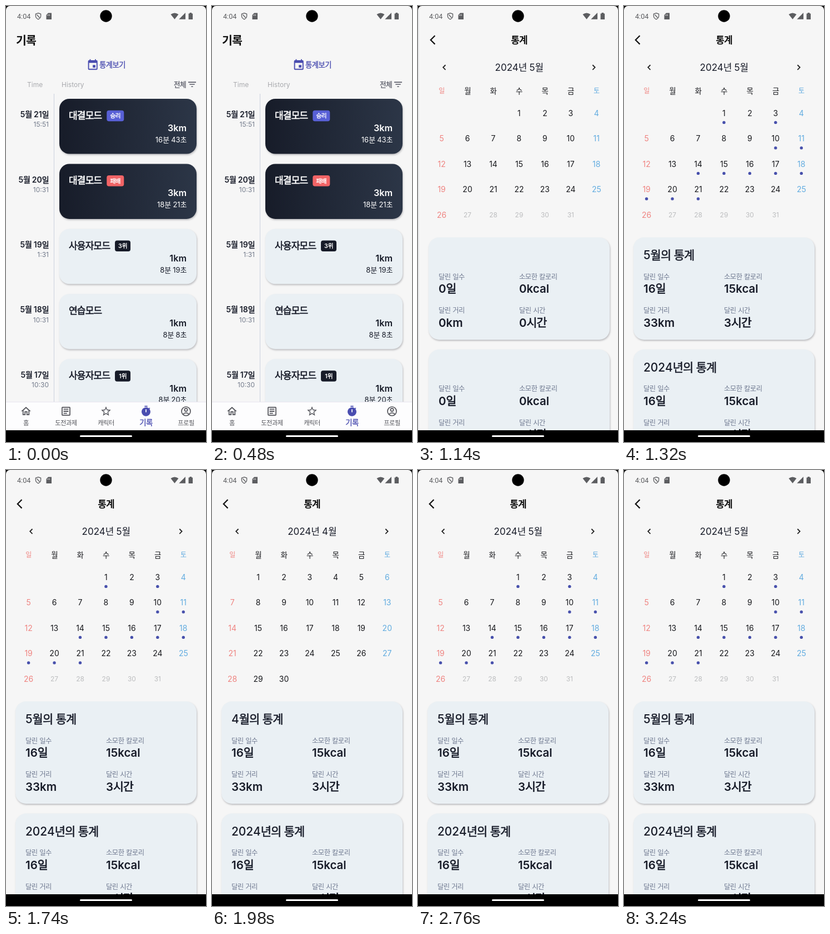
These frames come from a looping animation (360 px wide and 780 px high, 3300 ms). An HTML page:

```html
<!DOCTYPE html>
<html lang="ko">
<head>
<meta charset="utf-8">
<style>
  html, body { margin: 0; width: 100%; height: 100%; overflow: hidden; background: #f6f6f6; }
  svg { display: block; width: 100%; height: 100%; }
  text { font-family: Inter, "Noto Sans CJK KR", "Noto Sans CJK", sans-serif; white-space: pre; }
  .ko { letter-spacing: -.045em; }
  /* semi-bold Hangul: the regular cut, slightly thickened */
  .semi .ko { font-weight: 400; stroke-width: .036em; stroke-linejoin: round; }
  .medium .ko { font-weight: 400; stroke-width: .024em; stroke-linejoin: round; }
  .semi, .medium { stroke-width: 0; }
  .clock { font-family: Roboto, sans-serif; }
  .card { filter: drop-shadow(1px 2px 1.5px rgba(60, 60, 70, .3)); }
</style>
</head>
<body>
<svg id="stage" viewBox="0 0 360 780" xmlns="http://www.w3.org/2000/svg"></svg>
<script>
const LOOP = 3300, STEP = 60;
const INK = '#171b28', ACCENT = '#4a4db0', PAPER = '#f6f6f6', LIGHT = '#eaf0f4';
const RED = '#ef8481', BLUE = '#62ace0';
const COLUMN = 46.45, MONTH_WIDTH = COLUMN * 7;
const WEIGHT_CLASS = { 500: 'medium', 600: 'semi' };

const hangul = s => s.replace(/[가-힣]+/g, '<tspan class="ko">$&</tspan>');

// y is the vertical middle of the glyphs
function label(s, x, y, size, { fill = INK, weight = 400, anchor = 'start', id = '', cls = '' } = {}) {
  const base = y + size * (/[가-힣]/.test(s) ? .375 : .364);
  const tone = WEIGHT_CLASS[weight];
  return `<text ${id && `id="${id}"`} class="${tone || cls}" x="${x}" y="${base.toFixed(2)}" font-size="${size}"
    font-weight="${weight}" fill="${fill}" stroke="${tone ? fill : 'none'}" text-anchor="${anchor}">${hangul(s)}</text>`;
}
const box = (x, y, w, h, r, fill, cls = '') =>
  `<rect class="${cls}" x="${x}" y="${y}" width="${w}" height="${h}" rx="${r}" fill="${fill}"/>`;
const icon = (d, cx, cy, scale, fill) =>
  `<path transform="translate(${cx} ${cy}) scale(${scale}) translate(-12 -12)" fill="${fill}" fill-rule="evenodd" d="${d}"/>`;
const line = (d, stroke, width = 2) =>
  `<path fill="none" d="${d}" stroke="${stroke}" stroke-width="${width}"/>`;

const ICONS = {
  event: 'M17 12h-5v5h5zM16 1v2H8V1H6v2H5a2 2 0 0 0-2 2v14a2 2 0 0 0 2 2h14a2 2 0 0 0 2-2V5a2 2 0 0 0-2-2h-1V1zM19 19H5V8h14z',
  filter: 'M10 18h4v-2h-4zM3 6v2h18V6zM6 13h12v-2H6z',
  home: 'M12 5.7l5 4.5V18h-2v-6H9v6H7v-7.8zM12 3L2 12h3v8h6v-6h2v6h6v-8h3z',
  article: 'M19 5v14H5V5zM19 3H5a2 2 0 0 0-2 2v14a2 2 0 0 0 2 2h14a2 2 0 0 0 2-2V5a2 2 0 0 0-2-2zM14 17H7v-2h7zM17 13H7v-2h10zM17 9H7V7h10z',
  star: 'M22 9.24l-7.19-.62L12 2 9.19 8.63 2 9.24l5.46 4.73L5.82 21 12 17.27 18.18 21l-1.63-7.03zM12 15.4l-3.76 2.27 1-4.28-3.32-2.88 4.38-.38L12 6.1l1.71 4.04 4.38.38-3.32 2.88 1 4.28z',
  timer: 'M9 1h6v2H9zM19.03 7.39l1.42-1.42-1.41-1.41-1.42 1.42A9 9 0 1 0 19.03 7.39zM13 14h-2V8h2z'
};

function record(i, [day, time, mode, badge, badgeFill, distance, duration]) {
  const y = 166 + 116.4 * i, dark = i < 2, ink = dark ? '#fff' : INK;
  const badgeX = 122.3 + 14.75 * mode.length, badgeW = /\d/.test(badge) ? 28 : 31;
  return label(`5월 ${day}일`, 77, y + 28, 14, { weight: 600, anchor: 'end' })
    + label(time, 77, y + 46, 12, { fill: '#737b8b', anchor: 'end' })
    + box(96, y, 247, 98.5, 18, dark ? 'url(#night)' : LIGHT, 'card')
    + label(mode, 113, y + 29.5, 17, { fill: ink, weight: 600 })
    + (badge ? box(badgeX, y + 20.7, badgeW, 19.5, 4, badgeFill)
      + label(badge, badgeX + badgeW / 2, y + 30.5, 10.6, { fill: '#fff', weight: 600, anchor: 'middle' }) : '')
    + label(distance, 325, y + 52, 16.2, { fill: ink, weight: 600, anchor: 'end' })
    + label(duration, 325, y + 73, 13, { fill: ink, anchor: 'end' });
}

function listPage() {
  const records = [
    ['21', '15:51', '대결모드', '승리', '#5860d6', '3km', '16분 43초'],
    ['20', '10:31', '대결모드', '패배', '#f26466', '3km', '18분 21초'],
    ['19', '1:31', '사용자모드', '3위', INK, '1km', '8분 19초'],
    ['18', '10:31', '연습모드', '', '', '1km', '8분 8초'],
    ['17', '10:30', '사용자모드', '1위', INK, '1km', '8분 20초']
  ];
  const grey = '#55565c', tab = { fill: grey, anchor: 'middle' };
  const names = ['홈', '도전과제', '캐릭터', '기록', '프로필'];
  const tabs = ['home', 'article', 'star', 'timer'];
  return box(0, 0, 360, 780, 0, PAPER)
    + label('기록', 18, 61, 20.5, { weight: 700, fill: '#111' })
    + icon(ICONS.event, 156.2, 105.6, .95, ACCENT)
    + label('통계보기', 168, 105, 13.4, { fill: ACCENT, weight: 500 })
    + label('Time', 38, 140.5, 12, { fill: '#a9aaae' })
    + label('History', 100, 140.5, 12, { fill: '#a9aaae' })
    + label('전체', 302, 140.5, 12.6, { fill: '#5b5d69', weight: 500 })
    + icon(ICONS.filter, 335, 140.3, .78, '#5b5d69')
    + box(86, 157, 1, 552, 0, '#cbd2de')
    + records.map((r, i) => record(i, r)).join('')
    + box(0, 708, 360, 52, 0, '#fdfdfe') + box(0, 708, 360, 1, 0, '#e9e6f0')
    + tabs.map((t, i) => icon(ICONS[t], 36 + 72 * i, 725, .88, i == 3 ? ACCENT : grey)).join('')
    + `<g fill="none" stroke="${grey}" stroke-width="1.7"><circle cx="324" cy="725" r="8"/>
       <circle cx="324" cy="722.5" r="2.6"/><path d="M318.3 730.3q5.7-5 11.4 0"/></g>`
    + names.map((n, i) => i == 3
      ? label(n, 252, 745, 13.5, { fill: ACCENT, anchor: 'middle', weight: 500 })
      : label(n, 36 + 72 * i, 746, 11.3, tab)).join('');
}

function month(firstColumn, days, lastActive, marks) {
  const weekdays = [...'일월화수목금토'];
  const colour = c => c == 0 ? RED : c == 6 ? BLUE : '#17181c';
  const columnX = c => 40.6 + COLUMN * c;
  let out = weekdays.map((d, c) =>
    label(d, columnX(c), 151.5, c % 6 ? 13.5 : 12, { fill: colour(c), anchor: 'middle' })).join('');
  let dots = '';
  for (let d = 1; d <= days; d++) {
    const cell = firstColumn + d - 1, c = cell % 7, y = 191.7 + 45.5 * Math.floor(cell / 7);
    const off = d > lastActive;
    out += label(`${d}`, columnX(c), y, off ? 12 : 14, { fill: off ? '#bcbdbf' : colour(c), anchor: 'middle' });
    if (marks.includes(d)) dots += `<circle cx="${columnX(c)}" cy="${y + 16.7}" r="2.7" fill="#4750ac"/>`;
  }
  return out + `<g class="dots">${dots}</g>`;
}

function summary(key, y) {
  const cell = (name, id, x, dy) => label(name, x, y + dy, 12.4, { fill: '#707a91' })
    + label('0일', x, y + dy + 21.7, 20.5, { weight: 600, id: key + id });
  return box(17, y, 326, 183, 19, LIGHT, 'card')
    + label('통계', 35, y + 31.3, 20.9, { weight: 500, id: key + 'Title' })
    + cell('달린 일수', 'Days', 35, 70) + cell('소모한 칼로리', 'Energy', 180, 70)
    + cell('달린 거리', 'Distance', 35, 130.5) + cell('달린 시간', 'Hours', 180, 130.5);
}

function statsPage() {
  const marks = [1, 3, 10, 11, 14, 15, 16, 17, 18, 19, 20, 21];
  return box(-3, 0, 3, 780, 0, '#e5e6e8') + box(0, 0, 360, 780, 0, PAPER)
    + line('M28.5 53L20.8 60.7l7.7 7.7', '#111', 2.2)
    + label('통계', 180, 61, 17, { weight: 700, anchor: 'middle', fill: '#111' })
    + line('M47.5 105.5L43.2 109.8l4.3 4.3', '#222', 1.8)
    + line('M312.3 105.5l4.3 4.3l-4.3 4.3', '#222', 1.8)
    + label('2024년 5월', 180, 110, 17, { anchor: 'middle', id: 'header' })
    + `<g clip-path="url(#calendar)"><g id="months"><g>${month(3, 31, 26, marks)}</g>
       <g transform="translate(${-MONTH_WIDTH})">${month(1, 30, 30, [])}</g></g></g>`
    + summary('month', 414) + summary('year', 614.5);
}

function systemBars() {
  const grey = '#5c5d60';
  return '<path d="M0 0H7A7 7 0 0 0 0 7zM360 0V7A7 7 0 0 0 353 0z"/><circle cx="180" cy="18" r="10.7"/>'
    + label('4:04', 20, 18.5, 12.6, { fill: grey, cls: 'clock' })
    + line('M58 12.6l4.6 1.7v3.5q0 4-4.6 6q-4.6-2-4.6-6v-3.5z', grey, 1.3)
    + line('M55.5 15.5l5 5.5', grey, 1.3)
    + `<g fill="${grey}"><path d="M76 12.5h6v11.5h-9.5v-8z"/><path d="M296.5 15q7-5 14 0l-7 8.7z"/>
       <path d="M323 12v11.7h-11.7z"/><path d="M328.6 13.5h2v-1.5h3.5v1.5h2v10.5h-7.5z"/></g>`
    + line('M74.5 15.5v2m2-2.5v2.5m2-2.5v2.5', PAPER, .8)
    + box(0, 759, 360, 21, 0, '#000') + box(133, 768, 94, 3, 1.5, '#fff');
}

const stage = document.getElementById('stage');
stage.innerHTML = `<defs>
  <linearGradient id="night"><stop stop-color="#171c29"/><stop offset="1" stop-color="#2c3647"/></linearGradient>
  <clipPath id="calendar"><rect x="17" y="135" width="326" height="265"/></clipPath></defs>
  <g id="list">${listPage()}</g><g id="stats">${statsPage()}</g>${systemBars()}`;

const el = id => document.getElementById(id);
const write = (id, s) => { el(id).innerHTML = hangul(s); };
const clamp = v => Math.min(1, Math.max(0, v));
const slide = (t, start) => 1 - (1 - clamp((t - start) / 130)) ** 3;

function fill(key, title, loaded) {
  write(key + 'Title', title);
  write(key + 'Days', loaded ? '16일' : '0일');
  write(key + 'Energy', loaded ? '15kcal' : '0kcal');
  write(key + 'Distance', loaded ? '33km' : '0km');
  write(key + 'Hours', loaded ? '3시간' : '0시간');
}

let shown = -1;
function render(t) {
  if (t === shown) return;
  shown = t;
  const open = t >= 1140, ready = t >= 1200;
  el('list').style.display = open ? 'none' : '';
  el('stats').style.display = open ? '' : 'none';
  el('stats').setAttribute('transform', `translate(${2 * clamp((1200 - t) / 60)})`);

  const pan = slide(t, 1880) - slide(t, 2580);
  const number = pan > .5 ? 4 : 5;
  const loaded = ready && (t < 2040 || t >= 2760);
  el('months').setAttribute('transform', `translate(${pan * MONTH_WIDTH})`);
  write('header', `2024년 ${number}월`);
  fill('month', ready ? `${number}월의 통계` : '', loaded);
  fill('year', ready ? '2024년의 통계' : '', ready);
  for (const dots of document.querySelectorAll('.dots')) dots.style.display = loaded ? '' : 'none';
}

const start = performance.now();
function tick() {
  const t = (performance.now() - start) % LOOP;
  render(Math.floor(t / STEP) * STEP);
  requestAnimationFrame(tick);
}
tick();
</script>
</body>
</html>
```
